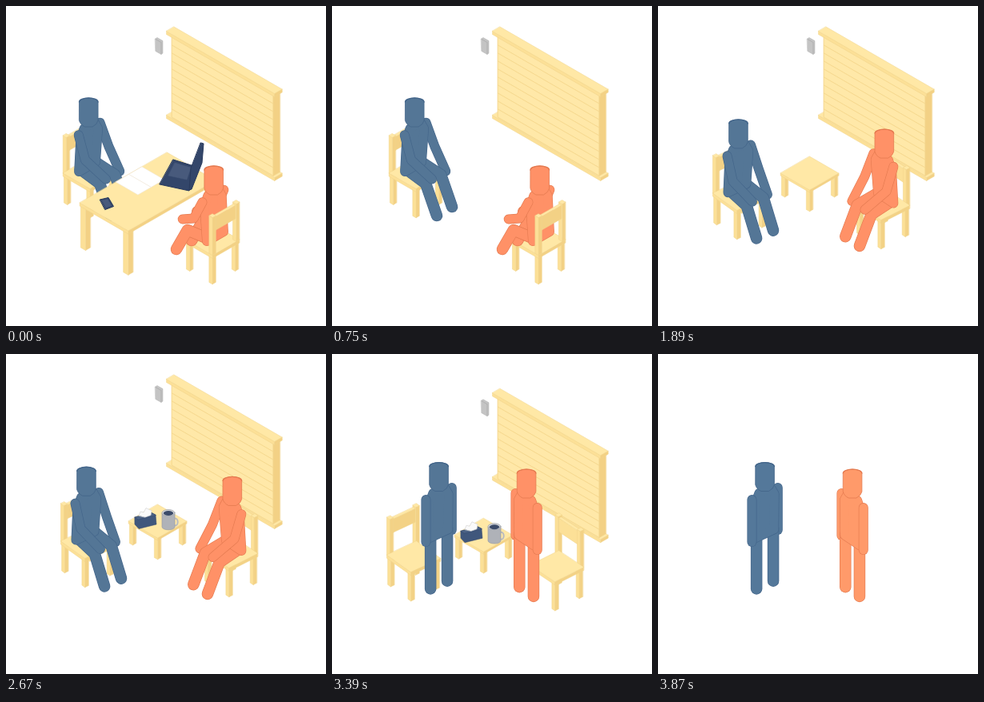
These frames come from a looping animation (400 by 400 pixels, 4.08 s). An HTML page:

```html
<!DOCTYPE html>
<html lang="en">
<head>
<meta charset="utf-8">
<title>Two people, one room</title>
<style>
  html, body { margin: 0; width: 100%; height: 100%; overflow: hidden; background: #fff; }
  svg { display: block; width: 100vw; height: 100vh; }
</style>
</head>
<body>
<svg id="stage" viewBox="0 0 400 400" stroke-linejoin="round" stroke-linecap="round"></svg>
<script>
const LOOP = 4080, STEP = 30;
const stage = document.getElementById('stage');

// ---- time and easing ----
const clamp = v => Math.max(0, Math.min(1, v));
const span = (t, a, b) => clamp((t - a) / (b - a));
const lerp = (a, b, k) => a + (b - a) * k;
const easeIn = k => k ** 3;
const easeOut = k => 1 - (1 - k) ** 3;
const easeInOut = k => k < .5 ? 4 * k ** 3 : 1 - 4 * (1 - k) ** 3;
const backIn = (k, s = 1.1) => k * k * ((s + 1) * k - s);

// ---- drawing helpers ----
const n = v => v.toFixed(2);
const pts = list => list.map(p => n(p[0]) + ',' + n(p[1])).join(' ');
const poly = (list, fill, stroke = fill, w = .5) =>
  `<polygon points="${pts(list)}" fill="${fill}" stroke="${stroke}" stroke-width="${w}"/>`;
const shift = (dx, dy, body, opacity = 1) =>
  `<g transform="translate(${n(dx)} ${n(dy)})" opacity="${n(opacity)}">${body}</g>`;
const mix = (a, b, k) => `rgb(${a.map((v, i) => Math.round(lerp(v, b[i], k))).join()})`;

const WOOD = { top: '#ffe8a6', edge: '#f1d48c', left: [252, 224, 151], right: [243, 209, 133] };
const NAVY = '#33466a', NAVY_EDGE = '#293a5c', NAVY_LIGHT = '#485a7c';

// ---- isometric space, turned around the vertical axis at a floor point ----
function placer(cx, cy, degrees = 0) {
  const turn = degrees * Math.PI / 180, c = Math.cos(turn), s = Math.sin(turn);
  return {
    turn,
    facesUs: c + s > 0,
    depth: (x, y) => x * (c + s) + y * (c - s),
    at(x, y, z) {
      const u = x * c - y * s, v = x * s + y * c;
      return [cx + (u - v) * .866, cy + (u + v) * .5 - z];
    }
  };
}

const flat = (place, x0, x1, y0, y1, z) =>
  [[x0, y0], [x1, y0], [x1, y1], [x0, y1]].map(p => place.at(...p, z));

// box: [x0, x1, y0, y1, z0, z1]
function box(place, [x0, x1, y0, y1, z0, z1]) {
  const ring = [[x1, y0], [x1, y1], [x0, y1], [x0, y0]];
  let out = '';
  ring.forEach((a, i) => {
    const b = ring[(i + 1) % 4], normal = place.turn + i * Math.PI / 2;
    const c = Math.cos(normal), s = Math.sin(normal);
    if (c + s < .01) return;
    const side = [place.at(...a, z0), place.at(...b, z0), place.at(...b, z1), place.at(...a, z1)];
    out += poly(side, mix(WOOD.left, WOOD.right, clamp((1 + c - s) / 2)), WOOD.edge);
  });
  return out + poly(flat(place, x0, x1, y0, y1, z1), WOOD.top, WOOD.edge);
}
function boxes(place, list) {
  const depth = b => place.depth(b[0] + b[1], b[2] + b[3]);
  return list.sort((a, b) => depth(a) - depth(b)).map(b => box(place, b)).join('');
}

// Four legs under a board.
function table(place, w, d, h, leg, thick) {
  const x = w / 2, y = d / 2, legs = [];
  for (const lx of [.7 - x, x - leg - .7]) for (const ly of [.7 - y, y - leg - .7])
    legs.push([lx, lx + leg, ly, ly + leg, 0, h - thick]);
  return boxes(place, legs) + box(place, [-x, x, -y, y, h - thick, h]);
}

function chair(place) {
  const r = 19.5, leg = 4.8;
  return {
    seat: table(place, 2 * r, 2 * r, 37, leg, 4),
    back: boxes(place, [
      [-r, leg - r, -r, leg - r, 37, 84],
      [1 - r, 4 - r, leg - r, r - leg, 65, 82],
      [-r, leg - r, r - leg, r, 37, 84]
    ])
  };
}

// ---- people: one skeleton, x forward, y sideways (mirrored), z up ----
const BLUE = { fill: [84, 118, 150], line: '#43658a', pale: [84, 120, 154] };
const CORAL = { fill: [255, 145, 103], line: '#e47a50', pale: [255, 154, 106] };
const SIT = {
  head: [-2, 0, 125], shoulder: [-1, 15.5, 92], elbow: [10, 17, 67], hand: [33, 10, 51],
  hip: [-4, 10, 45], knee: [25, 11, 42], foot: [41, 11, 10]
};
const STAND = {
  head: [41, 0, 155], shoulder: [41, 17, 121], elbow: [41, 17, 95], hand: [41, 17, 68],
  hip: [41, 11, 73], knee: [41, 11, 42], foot: [41, 11, 7]
};

function limb(list, w, fill, edge) {
  const p = `points="${pts(list)}" fill="none"`;
  return `<polyline ${p} stroke="${edge}" stroke-width="${w}"/>` +
    `<polyline ${p} stroke="${fill}" stroke-width="${w - 1.3}"/>`;
}

function head([x, y], fill, edge) {
  const r = 11.8, cap = `M${n(x - r)} ${n(y)}A${r} 5 0 0 1 ${n(x + r)} ${n(y)}`;
  return `<path d="${cap}v23q-1 5 -7 8h${n(14 - 2 * r)}q-6 -3 -7 -8z" fill="${fill}" stroke="${edge}" stroke-width=".8"/>` +
    `<path d="${cap}" fill="none" stroke="${edge}" stroke-width="1.3"/>`;
}

function person(place, hue, stand, hop, pale) {
  const fill = mix(hue.fill, hue.pale, pale), edge = hue.line;
  const joint = name => SIT[name].map((v, i) => lerp(v, STAND[name][i], stand));
  const side = (s, names) => names.map(name => {
    const [x, y, z] = joint(name);
    return place.at(x, s * y, z + (name === 'knee' || name === 'foot' ? 0 : hop));
  });
  const arm = s => limb(side(s, ['shoulder', 'elbow', 'hand']), 12, fill, edge);
  const leg = s => limb(side(s, ['hip', 'knee', 'foot']), 14.5, fill, edge);
  const near = place.depth(0, 1) > 0 ? 1 : -1;

  const [sx, , sz] = joint('shoulder'), [hx, , hz] = joint('hip');
  const rows = [[sx, 7.5, sz + 4], [sx, 12.5, sz - 6], [hx, 12, hz - 2]];
  const edgeOf = s => rows.map(([x, y, z]) => place.at(x, s * y, z + hop));
  const torso = [...edgeOf(1), ...edgeOf(-1).reverse()];

  return arm(-near) + leg(-near) + leg(near) +
    poly(torso, edge, edge, 12) + poly(torso, fill, fill, 10.8) +
    head(side(1, ['head'])[0], fill, edge) + arm(near);
}

// ---- room and things ----
function blinds() {
  const place = placer(210, 26), count = 10, h = 100 / count;
  let out = box(place, [0, 156, 0, 11, -109, -105]) + box(place, [7, 153, 0, 10, -105, -4]);
  for (let i = 0; i < count; i++) {
    const top = -4.5 - i * h, at = (x, z) => place.at(x, 10, z);
    out += poly([at(7, top), at(153, top), at(153, top - h), at(7, top - h)], '#ffe8a8', '#f4d68c', .7);
  }
  return out + box(place, [0, 156, 0, 11, -4, 0]);
}
const wallUnit = poly([[186.5, 41], [189, 39.5], [196, 43.5], [196, 59], [194, 60.5], [187, 56.5]], '#c4c4c4', '#b2b2b2') +
  '<path d="M187 41.5l7 4v14.5" fill="none" stroke="#adadad" stroke-width=".8"/>';
const room = blinds() + wallUnit;

const deskPlace = placer(177, 288);
const desk = table(deskPlace, 70, 126, 56, 7, 4) +
  poly(flat(deskPlace, -35, -3, -27, -8, 56), '#fff', '#ece5da') +
  poly(flat(deskPlace, -35, -3, -8, 11, 56), '#fff', '#ece5da') +
  poly([[209, 192], [238, 201], [229, 231], [192, 223]], NAVY, NAVY_EDGE, 1) +
  poly([[211, 196], [231, 202], [226, 217], [203, 212]], NAVY_LIGHT) +
  poly([[243.5, 171], [247, 172], [245, 196], [232, 229], [229, 230], [231, 203]], NAVY, NAVY_EDGE, 1) +
  poly([[117.5, 242], [128, 239.5], [134.5, 250.5], [124, 254.5]], NAVY, NAVY_EDGE, 1) +
  poly([[120, 243], [127, 241.5], [131.5, 249.5], [125, 252]], NAVY_LIGHT);

const sideTable = table(placer(189.5, 236.5), 42, 42, 27.5, 4.8, 3);
const things =
  poly([[161, 204], [182, 198.5], [187, 201], [188, 213], [166, 218.5], [161, 213]], '#40577c', NAVY) +
  poly([[161, 204], [182, 198.5], [187.5, 201.5], [165.5, 207]], '#4c6386', NAVY) +
  '<path d="M166 202l2-5 4 1 3-5.5 4 2 3 1-1 6-7 2.5z" fill="#fafafa" stroke="#d5d5d5" stroke-width=".7"/>' +
  '<ellipse cx="211.5" cy="210" rx="3.2" ry="4.5" fill="none" stroke="#b9bbc0" stroke-width="2"/>' +
  '<path d="M195 199v17a8 3.8 0 0 0 16 0v-17z" fill="#afb2b8" stroke="#999da5" stroke-width=".7"/>' +
  '<ellipse cx="203" cy="198.5" rx="8" ry="4" fill="#d3d5d8" stroke="#999da5" stroke-width=".7"/>' +
  '<ellipse cx="203" cy="199" rx="6.2" ry="2.9" fill="#3b4b69"/>';

// ---- one frame ----
function draw(t) {
  const leave = backIn(span(t, 60, 735));
  const turn = easeInOut(span(t, 765, 1460));
  const enter = easeOut(span(t, 1245, 1680));
  const rise = span(t, 2655, 3180), stand = easeInOut(rise);
  const drop = 392 * easeIn(span(t, 3210, 3720));
  const pale = span(t, 3720, 3870);
  const hop = 7 * Math.sin(Math.PI * rise);

  const left = placer(lerp(105, 102, turn), lerp(246, 273, turn), 6 * turn);
  const right = placer(lerp(258, 281, turn), lerp(329, 285, turn), lerp(180, 94, turn));
  const man = person(left, BLUE, stand, hop, pale);
  const guest = person(right, CORAL, stand, hop, pale);
  const chairL = chair(left), chairR = chair(right);
  const fall = body => drop < 390 ? shift(0, drop, body) : '';

  let floor = room;
  if (enter > 0)
    floor += shift(-235 * (1 - enter), -136 * (1 - enter), sideTable + shift(0, 0, things, span(t, 1890, 2310)));

  let out = fall(floor) + fall(chairL.back + chairL.seat) + man;
  if (leave < 1) out += shift(-300 * leave, 173 * leave, desk);
  out += right.facesUs
    ? fall(chairR.back + chairR.seat) + guest
    : chairR.seat + guest + chairR.back;
  stage.innerHTML = out;
}

function tick() {
  const t = performance.now() % LOOP;
  draw(t - t % STEP);
  requestAnimationFrame(tick);
}
tick();
</script>
</body>
</html>
```
